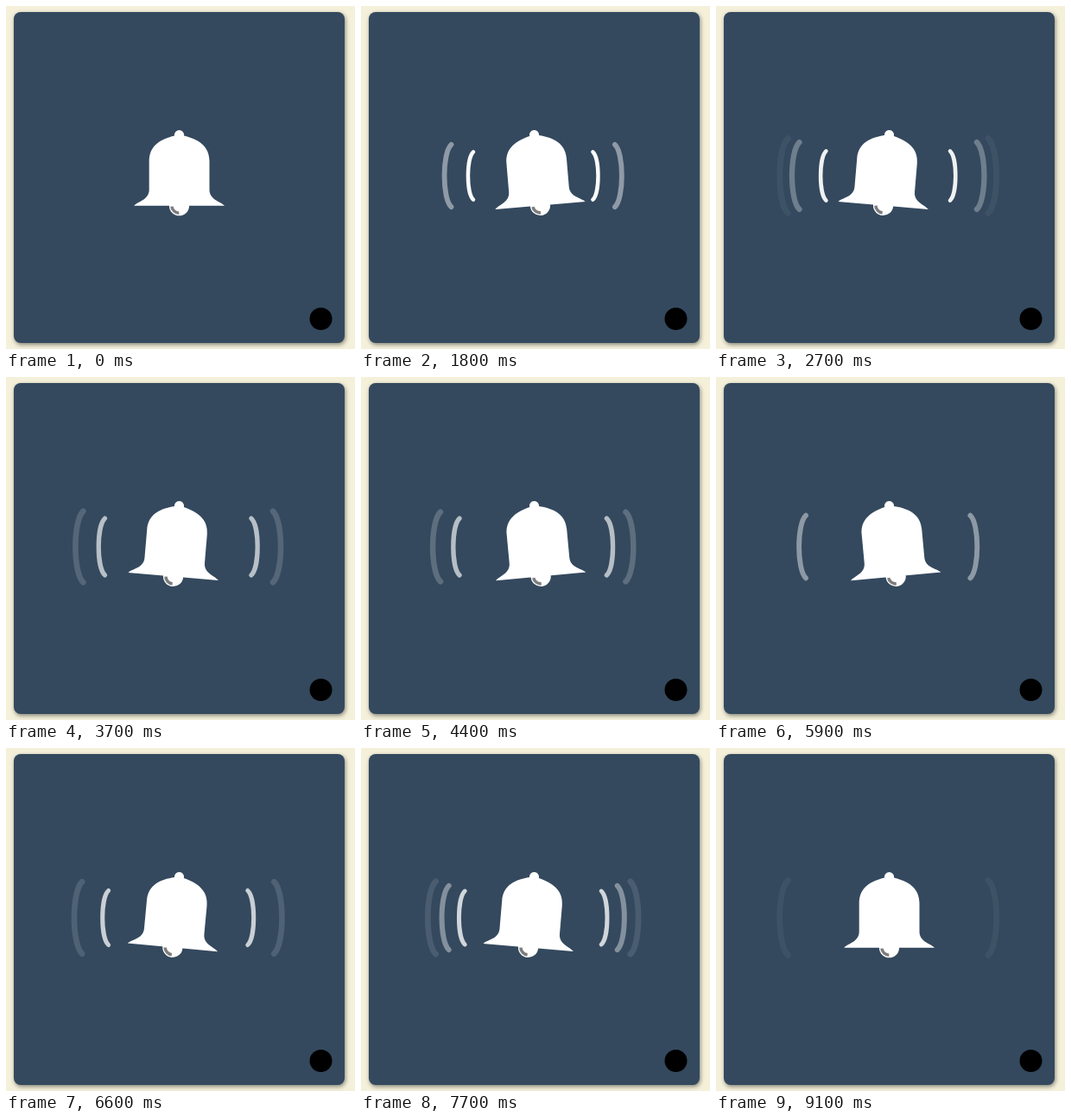
These frames come from a looping animation (404 px wide and 398 px high, 9300 ms). An HTML page:

```html
<!DOCTYPE html>
<html lang="en">
<head>
<meta charset="utf-8">
<title>Ringing bell</title>
<style>
  html, body { margin: 0; width: 100%; height: 100%; overflow: hidden; background: #f4f0da; }
  .card {
    position: absolute; left: 9px; top: 7px; width: 383px; height: 384px;
    border-radius: 8px; background: #34495e;
    box-shadow: 1px 2px 5px rgba(0, 0, 0, .45);
  }
  svg { position: absolute; left: 0; top: 0; display: block; }
  #waves path { fill: none; stroke: #fff; stroke-width: 4.4; stroke-linecap: round; }
</style>
</head>
<body>
<div class="card"></div>
<svg width="404" height="398" viewBox="0 0 404 398">
  <g id="waves"></g>
  <g id="bell" fill="#fff">
    <circle cx="200.5" cy="149.6" r="5.6"/>
    <path d="M148.2 231.8C153 226.5 165.7 225 165.7 213V180C165.7 162 179 154.5 195 150.5H206C222 154.5 235.5 162 235.5 180V213C235.5 225 248 226.5 253 231.8Z"/>
    <circle cx="200.5" cy="231.7" r="11.6"/>
    <path d="M191.9 232.6A8.6 8.6 0 0 0 200.3 240.2" fill="none" stroke="#7d7d7d" stroke-width="3.6"/>
  </g>
  <circle cx="364.5" cy="363" r="13"/>
</svg>
<script>
  const LOOP = 9300, STEP = 100, START = 1000, RESTART = 5050, END = 9000;
  // Each wave: birth and life in ms
  const WAVES = [
    [1100, 2000], [1780, 1900], [2630, 1700], [3310, 1900], [4000, 1900],
    [5080, 2300], [6300, 2000], [6950, 1900], [7450, 1930]
  ];
  const NS = "http://www.w3.org/2000/svg";
  const bell = document.getElementById("bell");
  const layer = document.getElementById("waves");

  const arc = () => {
    const el = document.createElementNS(NS, "path");
    el.setAttribute("d", "M8.2-27.4C.2-20 .2 20 8.2 27.4");
    return layer.appendChild(el);
  };
  const pairs = WAVES.map(() => [arc(), arc()]);

  function swing(t) {
    if (t <= START || t >= END) return 0;
    const age = t - START;
    const s = Math.sin(2 * Math.PI * age / 500);
    if (Math.abs(s) < 1e-6) return 0;
    const ramp = Math.min(1, (age % 4000) / 160);
    return 5.4 * ramp * Math.sign(s) * Math.abs(s) ** 0.2;
  }

  function drawWave([left, right], [birth, life], t) {
    const x = (t - birth) / life;
    const shown = x >= 0 && x < 1 && !(birth < RESTART && t >= RESTART);
    const p = shown ? 1 - (1 - x) ** 1.7 : 1;
    const d = 76.5 + 56 * p, s = 1 + 0.62 * p;
    [[left, -1], [right, 1]].forEach(([el, side]) => {
      el.setAttribute("transform", `translate(${199.2 + side * d} 197) scale(${-side * s} ${s})`);
      el.style.opacity = shown ? (1 - p) ** 1.1 : 0;
    });
  }

  function draw(ms) {
    const t = Math.min(END, Math.floor((ms % LOOP) / STEP) * STEP);
    bell.setAttribute("transform", `rotate(${swing(t)} 200.5 149.5)`);
    pairs.forEach((pair, i) => drawWave(pair, WAVES[i], t));
  }

  let begin;
  function tick(now) {
    begin ??= now;
    draw(now - begin);
    requestAnimationFrame(tick);
  }
  draw(0);
  requestAnimationFrame(tick);
</script>
</body>
</html>
```
